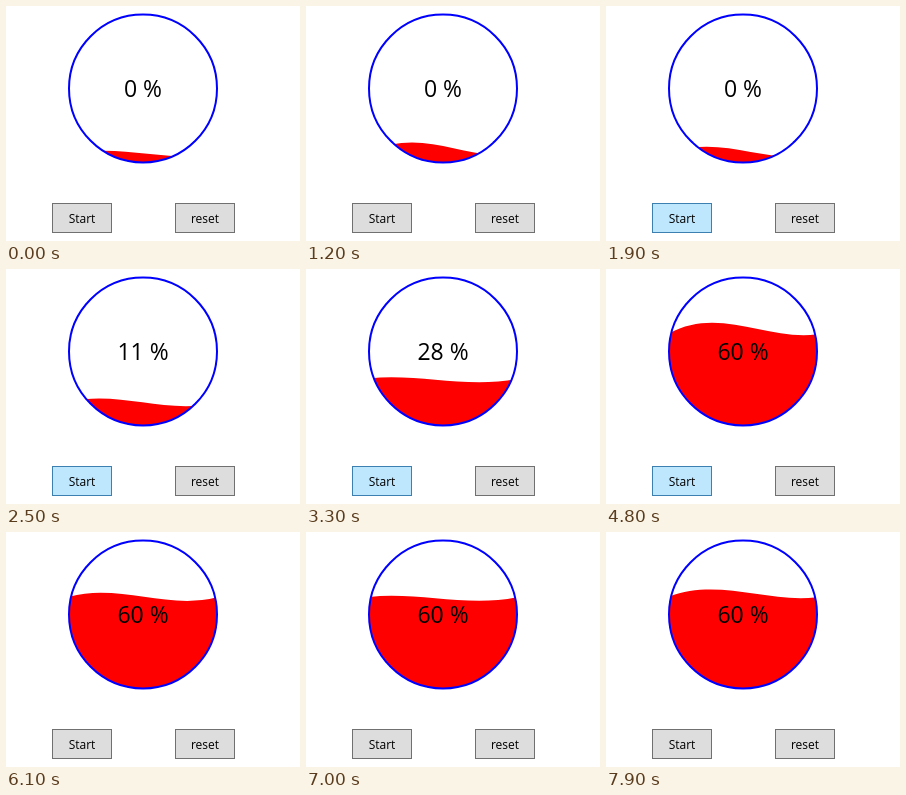
An HTML page that plays this animation: 294 by 235 pixels, repeating every 8000 ms.

```html
<!DOCTYPE html>
<html lang="en">
<head>
<meta charset="utf-8">
<title>Liquid progress</title>
<style>
  html, body { margin: 0; width: 100%; height: 100%; overflow: hidden; background: #fff; }
  svg { display: block; width: 294px; height: 235px; }
  text { font-family: "Open Sans", "Noto Sans", sans-serif; text-anchor: middle; fill: #000; }
  .label { font-size: 12px; }
  .value { font-size: 23px; }
  .button { fill: #ddd; stroke: #707070; }
  .button.hover { fill: #bee6fd; stroke: #3c7fb1; }
</style>
</head>
<body>
<svg viewBox="0 0 294 235">
  <clipPath id="bowl"><circle cx="137" cy="82.5" r="74"/></clipPath>
  <path id="liquid" fill="#f00" clip-path="url(#bowl)"/>
  <circle cx="137" cy="82.5" r="74" fill="none" stroke="#00f" stroke-width="2"/>
  <text id="value" class="value" x="137" y="91">0 %</text>
  <rect id="start" class="button" x="46.5" y="197.5" width="59" height="29"/>
  <text class="label" x="76" y="217">Start</text>
  <rect class="button" x="169.5" y="197.5" width="59" height="29"/>
  <text class="label" x="199" y="217">reset</text>
</svg>
<script>
const LOOP = 8000, STEP = 100, WAVE_PERIOD = 3700;
const liquid = document.getElementById("liquid");
const value = document.getElementById("value");
const start = document.getElementById("start");

// Runs 0 to 1 and back once per period, at 0 when t equals lowTime.
function triangle(t, lowTime, period) {
  const phase = ((t - lowTime) / period % 1 + 1) % 1;
  return 1 - Math.abs(1 - 2 * phase);
}

function percentAt(t) {
  return Math.max(0, Math.min(60, Math.round((t - 1985) / 46.9)));
}

function render(t) {
  const percent = percentAt(t);
  const level = 148.5 - 1.39 * percent;
  const crest = level - 3 - 29 * triangle(t, 3130, WAVE_PERIOD);
  const trough = level + 10 + 3.5 * Math.cos(2 * Math.PI * (t - 6200) / WAVE_PERIOD);
  liquid.setAttribute("d",
    `M62 ${level}C112 ${crest} 162 ${trough} 212 ${level}V160H62Z`);
  value.textContent = `${percent} %`;
  start.classList.toggle("hover", t >= 1500 && t < 5800);
}

const origin = performance.now();
function tick() {
  const t = (performance.now() - origin) % LOOP;
  render(Math.floor(t / STEP) * STEP);
  requestAnimationFrame(tick);
}
tick();
</script>
</body>
</html>
```
